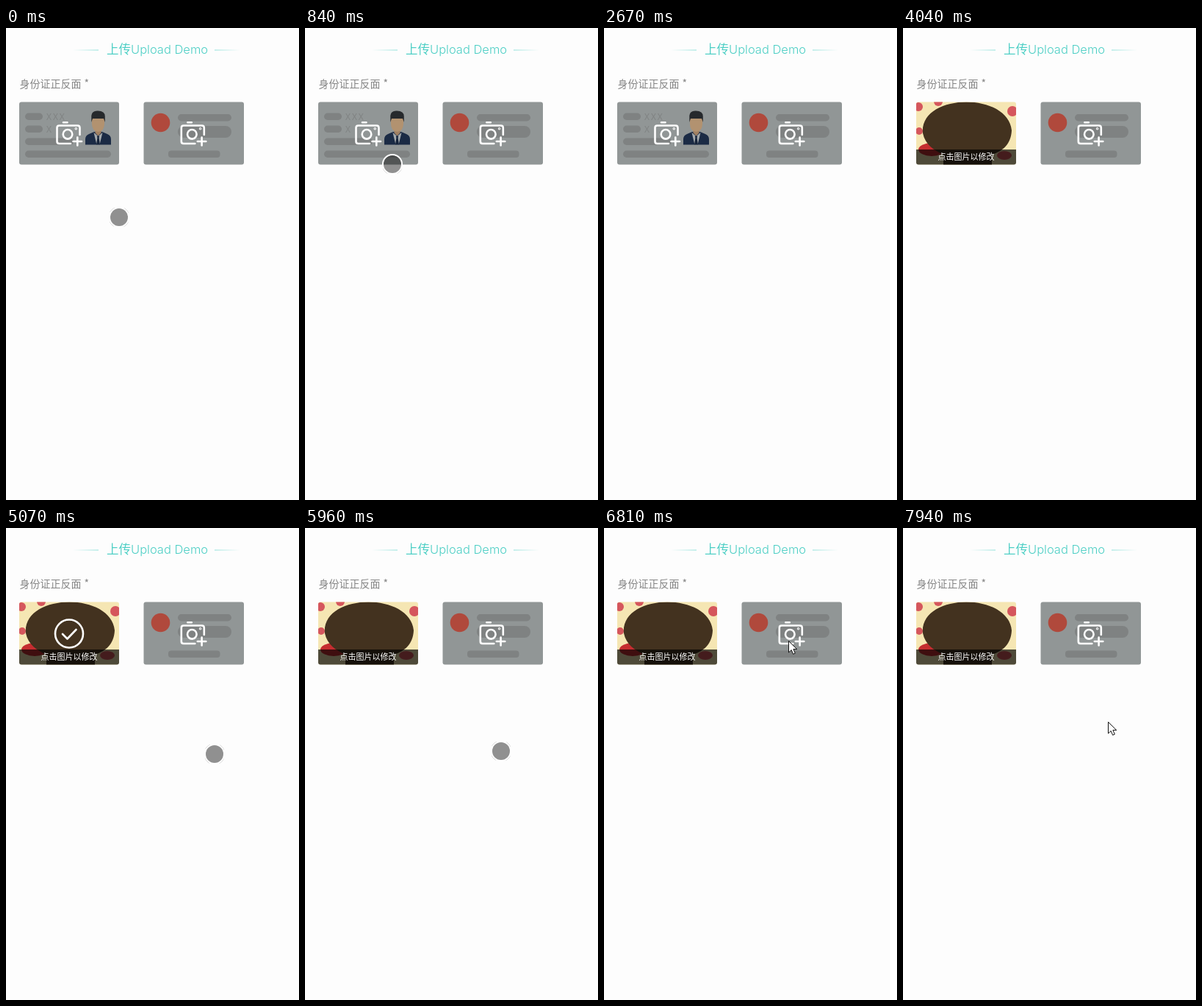
Write an HTML page that moves like this. It is 399 px wide and 641 px high and loops after 8 s.

```html
<!DOCTYPE html>
<html lang="zh-CN">
<head>
<meta charset="utf-8">
<title>Upload Demo</title>
<style>
  html, body { margin: 0; width: 100%; height: 100%; overflow: hidden; background: #fdfdfd; }
  svg { display: block; width: 399px; height: 641px; }
  text { font-family: "Noto Sans CJK SC", "Noto Sans CJK", sans-serif; }
  .title { font: 300 16.5px Inter, "Noto Sans CJK SC", "Noto Sans CJK", sans-serif; fill: #4dcfc5; }
  .label { font-size: 14px; font-weight: 500; fill: #858585; }
  .hint { font-size: 11px; fill: #fff; }
  .card { fill: #919696; }
  .bars { fill: #7f8282; }
  .bars text { font: 12px "Open Sans", sans-serif; }
  .line { fill: none; stroke: #fff; stroke-width: 2.6; stroke-linecap: round; stroke-linejoin: round; }
</style>
</head>
<body>
<svg viewBox="0 0 399 641">
  <defs>
    <linearGradient id="fade">
      <stop stop-color="#8fe0d9" stop-opacity="0"/>
      <stop offset="1" stop-color="#8fe0d9"/>
    </linearGradient>
    <clipPath id="frame"><rect x="18" y="100.5" width="136" height="85" rx="3"/></clipPath>
    <g id="camera" class="line">
      <path d="M88 157H72.5Q69.5 157 69.5 154V135.5Q69.5 132.500 72.500 132.500H97.500Q100.500 132.500 100.500 135.500V145"/>
      <path d="M78 128.300H83.500M91.500 154H103M97.300 148.500V159.500"/>
      <circle cx="84" cy="144.300" r="6.300"/>
      <circle cx="95.300" cy="136.800" r=".5" stroke-width="2.500"/>
    </g>
  </defs>

  <text class="title" x="137" y="34.500">上传Upload Demo</text>
  <rect x="91" y="29.500" width="35" height="1" fill="url(#fade)"/>
  <rect x="91" y="29.500" width="35" height="1" fill="url(#fade)" transform="translate(410) scale(-1 1)"/>
  <text class="label" x="18.500" y="80.500">身份证正反面</text>
  <text class="label" x="106.500" y="80">*</text>

  <g id="front">
    <rect class="card" x="18" y="100.500" width="136" height="85" rx="3"/>
    <g class="bars">
      <rect x="26" y="115.500" width="24" height="9.500" rx="4.700"/>
      <rect x="26" y="132.500" width="24" height="9.500" rx="4.700"/>
      <rect x="26" y="149.500" width="66" height="9.500" rx="4.700"/>
      <rect x="26" y="166.500" width="117" height="9.500" rx="4.700"/>
      <text x="55" y="124.500" letter-spacing="2">XXX</text>
      <text x="55" y="141.500">X</text>
    </g>
    <g id="person">
      <path fill="#1b2b45" d="M108 158.500V151Q108 146 113 144L120 141H131L138 144Q143 146 143 151V158.500Z"/>
      <path fill="#a4a9ac" d="M119.500 142L125.500 147L131.500 142L127.500 158.500H123.500Z"/>
      <path fill="#16243b" d="M123.800 146.500H127.200L126.600 149L128 158.500H123L124.400 149Z"/>
      <path fill="#a08062" d="M121.500 136H129.500V142.500L125.500 146.500L121.500 142.500Z"/>
      <path fill="#b29270" d="M117 121H134V130Q134 140 125.500 141Q117 140 117 130Z"/>
      <path fill="#26292c" d="M116.300 128V119Q117 112.500 124 112.500Q134.800 112 134.800 120V128L133 123H118Z"/>
    </g>
    <use href="#camera"/>
  </g>

  <g id="photo" clip-path="url(#frame)">
    <rect x="18" y="100" width="136" height="86" fill="#f5e6b3"/>
    <g fill="#d5565c">
      <circle cx="21" cy="107" r="6"/>
      <circle cx="48" cy="100" r="6"/>
      <circle cx="149" cy="113" r="7"/>
      <circle cx="22" cy="140" r="5"/>
      <ellipse cx="138" cy="173" rx="10" ry="6"/>
      <ellipse cx="39" cy="165" rx="18" ry="9" fill="#c52d30"/>
    </g>
    <path fill="#43321f" d="M27 143C22 88 143 86 148 139C147 158 136 167 121 172V186H55V172C42 166 30 158 27 143Z"/>
    <rect x="18" y="165" width="136" height="21" fill="#000" opacity=".68"/>
    <text class="hint" x="47.500" y="179.300">点击图片以修改</text>
    <g id="done" class="line">
      <circle cx="86" cy="143.500" r="19"/>
      <path d="M77 144L83.500 150.500L95.500 138"/>
    </g>
  </g>

  <g>
    <rect class="card" x="187.500" y="100.500" width="136.500" height="85" rx="3"/>
    <g class="bars">
      <rect x="234" y="117" width="73" height="9.500" rx="4.700"/>
      <rect x="234" y="133" width="73" height="16" rx="8"/>
      <rect x="221" y="166.500" width="70.500" height="9.500" rx="4"/>
    </g>
    <circle cx="210.500" cy="128.500" r="12.800" fill="#b0493c"/>
    <use href="#camera" x="169.300"/>
  </g>

  <g id="touch">
    <circle r="14" fill="none" stroke="#8a8a8a" stroke-width=".7" stroke-dasharray="8 14" stroke-dashoffset="-7"/>
    <circle r="13" fill="none" stroke="#fff" stroke-width="2"/>
    <circle r="12" fill="#000" fill-opacity=".43"/>
  </g>
  <path id="arrow" d="M.5 .5V16L4.200 12.600L6.600 18.300L9.300 17.100L6.900 11.600H11.800Z" fill="#fff" stroke="#111" stroke-linejoin="round"/>
</svg>
<script>
  const LOOP = 8000;
  // Pointer positions: [start in ms, x, y], each held until the next.
  const touchPath = [
    [0, 154, 257], [430, 150, 253], [550, 143, 246], [700, 130, 214],
    [840, 119, 185], [970, 110, 161], [1120, 108, 152], [1240, 108, 149],
    [1390, 106, 147], [1670],
    [5070, 284, 307], [5220, 268, 306], [5960, 267, 303], [6080, 266, 219],
    [6230, 254, 177], [6380, 253, 154], [6810]
  ];
  const arrowPath = [
    [0], [1670, 106, 146], [1820, 100, 149], [1940, 96, 148], [2410, 125, 179],
    [2550, 281, 298], [2670],
    [6810, 251, 153], [6970, 251, 209], [7120, 249, 235], [7240, 248, 246],
    [7390, 248, 250], [7670, 248, 251], [7940, 279, 263]
  ];
  const el = id => document.getElementById(id);
  const touch = el('touch'), arrow = el('arrow'), front = el('front'), photo = el('photo'), done = el('done');
  const show = (node, on) => { node.style.display = on ? '' : 'none'; };

  function place(node, path, t) {
    const [, x, y] = path.findLast(p => p[0] <= t);
    show(node, x !== undefined);
    if (x !== undefined) node.setAttribute('transform', `translate(${x} ${y})`);
  }

  function draw(now) {
    const t = now % LOOP;
    place(touch, touchPath, t);
    place(arrow, arrowPath, t);
    show(front, t < 4040);
    show(photo, t >= 4040);
    show(done, t >= 4470 && t < 5370);
  }

  let start;
  function tick(now) {
    start ??= now;
    draw(now - start);
    requestAnimationFrame(tick);
  }
  draw(0);
  requestAnimationFrame(tick);
</script>
</body>
</html>
```
